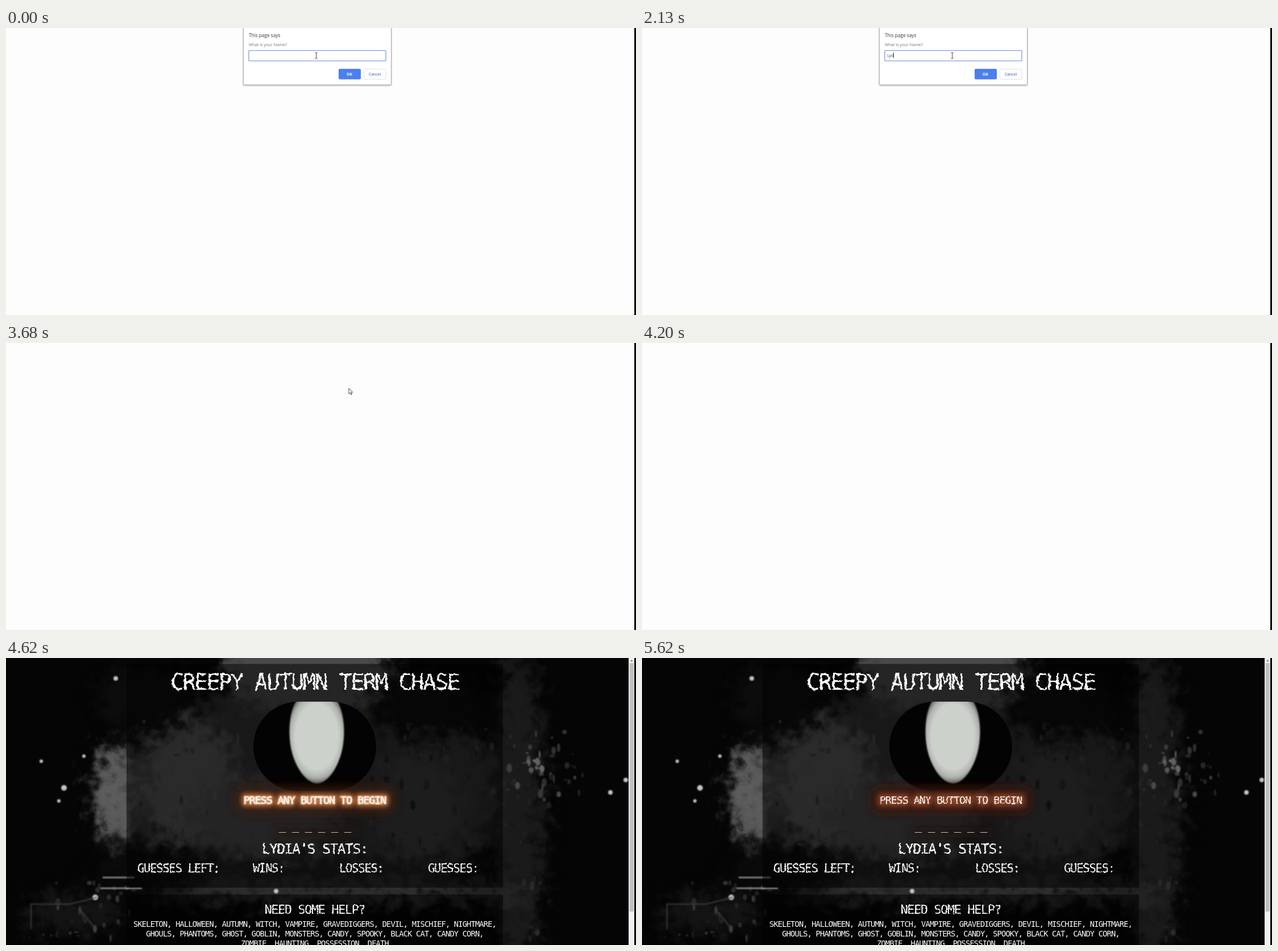
Recreate the animation shown at these times as an HTML page. Size 1108 by 506 pixels, loop 5.72 s.

```html
<!DOCTYPE html>
<html lang="en">
<head>
<meta charset="utf-8">
<title>Word game</title>
<style>
  html, body { margin: 0; width: 100%; height: 100%; overflow: hidden; background: #fdfdfd; }
  svg { display: block; width: 1108px; height: 506px; }
  .ui { font-family: "Open Sans", "Noto Sans", sans-serif; }
  .bone text { font-family: "DejaVu Sans Mono", monospace; letter-spacing: -.06em; white-space: pre; }
  .mid { text-anchor: middle; }
</style>
</head>
<body>
<svg viewBox="0 0 1108 506" xmlns="http://www.w3.org/2000/svg">
  <defs>
    <filter id="haze" x="-10%" y="-10%" width="120%" height="120%" color-interpolation-filters="sRGB">
      <feGaussianBlur stdDeviation="14" result="soft"/>
      <feTurbulence type="fractalNoise" baseFrequency=".045" numOctaves="4" seed="8"/>
      <feDisplacementMap in="soft" scale="75" xChannelSelector="R" yChannelSelector="G"/>
    </filter>
    <filter id="rough" x="-5%" y="-20%" width="110%" height="140%" color-interpolation-filters="sRGB">
      <feTurbulence type="fractalNoise" baseFrequency=".16" numOctaves="2" seed="3"/>
      <feDisplacementMap in="SourceGraphic" scale="6" xChannelSelector="R" yChannelSelector="G"/>
    </filter>
    <filter id="rough2" x="-5%" y="-20%" width="110%" height="140%" color-interpolation-filters="sRGB">
      <feTurbulence type="fractalNoise" baseFrequency=".25" numOctaves="2" seed="5"/>
      <feDisplacementMap in="SourceGraphic" scale="3" xChannelSelector="R" yChannelSelector="G"/>
    </filter>
    <filter id="blur1" x="-10%" y="-50%" width="120%" height="200%"><feGaussianBlur stdDeviation="1.1"/></filter>
    <filter id="blur4" x="-20%" y="-200%" width="140%" height="500%"><feGaussianBlur stdDeviation="4"/></filter>
    <filter id="blur9" x="-20%" y="-400%" width="140%" height="900%"><feGaussianBlur stdDeviation="8"/></filter>
    <filter id="shade" x="-5%" y="-5%" width="110%" height="115%">
      <feDropShadow dx="0" dy="1" stdDeviation="1" flood-opacity=".4"/>
    </filter>
    <radialGradient id="skin" cx=".5" cy=".44" r=".56">
      <stop offset=".7" stop-color="#cdd1cc"/>
      <stop offset=".88" stop-color="#aeb2ad"/>
      <stop offset="1" stop-color="#6d706c"/>
    </radialGradient>
    <clipPath id="pill"><rect x="435" y="77" width="216" height="158" rx="79"/></clipPath>
    <clipPath id="view"><rect width="1095" height="506"/></clipPath>
  </defs>

  <rect width="1108" height="506" fill="#fdfdfd"/>

  <g id="dialog" class="ui">
    <rect x="417.5" y="-6" width="260" height="106" rx="1" fill="#fff" stroke="#b4b4b4" filter="url(#shade)"/>
    <text x="427" y="16" font-size="8.25" fill="#3a3433">This page says</text>
    <text x="427" y="32" font-size="7.2" fill="#7d7370">What is your Name?</text>
    <rect x="427" y="39.7" width="241" height="18.3" rx="1" fill="#fff" stroke="#6488d8" stroke-width="1.1"/>
    <text id="entry" x="431.5" y="51" font-size="6.5" fill="#4a4646"></text>
    <rect id="caret" y="43" width="1" height="10" fill="#444"/>
    <rect x="585" y="72" width="39" height="18.5" rx="2" fill="#4b7ff0"/>
    <text x="604" y="83.7" class="mid" font-size="6.8" font-weight="700" fill="#fff">OK</text>
    <rect x="629.5" y="72.5" width="38.5" height="18" rx="2" fill="#fff" stroke="#dfe2ea"/>
    <text x="648.7" y="83.7" class="mid" font-size="6.7" font-weight="600" fill="#5c78cc">Cancel</text>
    <path id="beam" d="M543.5 43.5h1.5l.7.6.7-.6h1.5M545.7 44v9M543.5 53.5h1.5l.7-.6.7.6h1.5" fill="none" stroke="#333" stroke-width=".9"/>
  </g>
  <path id="arrow" d="M0 0V9.6L2.3 7.6 3.9 11.2 5.4 10.5 3.9 7H6.8Z" fill="#fff" stroke="#222" stroke-width=".8"/>

  <g id="game" clip-path="url(#view)">
    <rect width="1095" height="506" fill="#050505"/>
    <g id="scene" filter="url(#haze)"></g>
    <g id="sparks" filter="url(#blur1)"></g>
    <path d="M166 406H239M170 387H226" stroke="#bbb" stroke-width="2.4" filter="url(#blur1)" opacity=".8"/>
    <path d="M44 478V434H112L160 422M128 442L158 478" fill="none" stroke="#444" stroke-width="3" filter="url(#blur1)" opacity=".6"/>
    <path d="M212 10.500H874V405H212ZM212 417H874V506H212Z" fill="#000" opacity=".5"/>
    <g clip-path="url(#pill)">
      <rect x="435" y="77" width="216" height="158" fill="#030303"/>
      <path d="M512 74C498 92 496 130 501 158C507 190 527 221 547 221C567 221 586 190 592 158C597 130 595 94 581 74Z" fill="url(#skin)" filter="url(#blur1)"/>
    </g>
    <g class="bone" fill="#fff">
      <g id="glow">
        <use href="#press" id="outer" filter="url(#blur9)" stroke-width="34" stroke-linejoin="round"/>
        <use href="#press" id="inner" filter="url(#blur4)" stroke-width="9" stroke-linejoin="round"/>
        <use href="#press" id="core" filter="url(#blur1)" stroke="#ffe2c4" stroke-width="2"/>
        <use href="#blanks" id="faint" filter="url(#blur9)" stroke-width="16"/>
      </g>
      <text x="543" y="55.500" class="mid" font-size="39" filter="url(#rough)">CREEPY AUTUMN TERM CHASE</text>
      <g filter="url(#rough2)">
        <text id="press" x="543" y="256.500" class="mid" font-size="18.500">PRESS ANY BUTTON TO BEGIN</text>
        <text x="543" y="344.500" class="mid" font-size="24.500">LYDIA'S STATS:</text>
        <g id="stats" font-size="20.500"></g>
        <text x="543" y="450.500" class="mid" font-size="21.700">NEED SOME HELP?</text>
      </g>
      <text id="blanks" x="543" y="302.500" class="mid" font-size="21.200" fill="#e8d9cc">_ _ _ _ _ _</text>
      <g id="words" class="mid" font-size="13.700"></g>
    </g>
  </g>

  <g id="scroll">
    <rect x="1095" width="10" height="506" fill="#f1f1f1"/>
    <rect x="1096.5" y="9" width="7.500" height="438" fill="#c1c1c1"/>
    <path d="M1098 6L1100.300 3L1102.600 6Z" fill="#777"/>
  </g>
  <rect x="1105" width="3" height="506" fill="#000"/>
</svg>
<script>
const LOOP = 5720, GAME_START = 4350;
const $ = id => document.getElementById(id);

function add(parent, tag, attrs, text = '') {
  const el = document.createElementNS('http://www.w3.org/2000/svg', tag);
  for (const key in attrs) el.setAttribute(key, attrs[key]);
  el.textContent = text;
  return parent.appendChild(el);
}

function randomizer(seed) {
  return () => (seed = (seed * 16807) % 2147483647) / 2147483647;
}

const grey = v => `rgb(${v},${v},${v})`;

function buildScene() {
  // centre, radii, brightness
  const blobs = [
    [530, 240, 350, 190, 48], [900, 270, 45, 290, 26], [530, 20, 150, 90, 74],
    [190, 240, 34, 85, 92], [320, 220, 80, 115, 84], [450, 280, 130, 70, 72],
    [720, 260, 80, 90, 58], [580, 412, 330, 18, 52], [740, 90, 110, 55, 12],
    [245, 70, 80, 65, 12], [270, 370, 110, 42, 10], [560, 375, 250, 22, 26],
    [120, 450, 90, 35, 20]
  ];
  for (const [cx, cy, rx, ry, v] of blobs)
    add($('scene'), 'ellipse', { cx, cy, rx, ry, fill: grey(v) });

  const lights = [[193, 36, 4], [102, 229, 5], [93, 252, 3], [62, 182, 3],
    [157, 422, 5], [475, 411, 4], [1063, 237, 4], [1090, 215, 4], [137, 173, 3]];
  for (const [cx, cy, r] of lights)
    add($('sparks'), 'circle', { cx, cy, r, fill: '#c4c4c4' });

  const rnd = randomizer(77);
  const scatter = (count, x, y, w, h, size, dark, bright) => {
    for (let i = 0; i < count; i++)
      add($('sparks'), 'ellipse', {
        cx: x + rnd() * w, cy: y + rnd() * h,
        rx: 1 + rnd() * size, ry: 1 + rnd() * size * 1.8,
        fill: grey(dark + rnd() * (bright - dark))
      });
  };
  scatter(45, 880, 130, 140, 130, 4, 25, 75);
  scatter(14, 915, 165, 30, 35, 4, 70, 110);
  scatter(20, 885, 290, 60, 210, 4, 20, 42);
  scatter(35, 40, 395, 200, 100, 4, 20, 65);
  scatter(60, 640, 110, 220, 230, 5, 30, 60);
  scatter(45, 225, 100, 200, 230, 6, 45, 85);
}

function buildText() {
  const stats = { 'GUESSES LEFT:': 231, 'WINS:': 434, 'LOSSES:': 586, 'GUESSES:': 742 };
  for (const label in stats)
    add($('stats'), 'text', { x: stats[label], y: 378 }, label);
  [
    'SKELETON, HALLOWEEN, AUTUMN, WITCH, VAMPIRE, GRAVEDIGGERS, DEVIL, MISCHIEF, NIGHTMARE,',
    'GHOULS, PHANTOMS, GHOST, GOBLIN, MONSTERS, CANDY, SPOOKY, BLACK CAT, CANDY CORN,',
    'ZOMBIE, HAUNTING, POSSESSION, DEATH'
  ].forEach((line, i) => add($('words'), 'text', { x: 543, y: 473.5 + i * 17.3 }, line));
}

// time, typed text, caret visible
const typing = [
  [0, '', 0], [440, '', 1], [720, 'l', 1], [1280, 'l', 0], [1710, '', 1],
  [1860, 'L', 1], [2010, 'Ly', 1], [2130, 'Lyd', 1], [2280, 'Lydi', 1],
  [2430, 'Lydia', 1], [3010, 'Lydia', 0], [3530, 'Lydia', 1]
];
// time, pointer tip
const pointer = [
  [3010, 593, 90], [3130, 602, 89], [3260, 603, 83], [3380, 601, 79],
  [3530, 600, 78], [3680, 603, 80], [3810, 899, 258], [3960, 1018, 422]
];
const latest = (steps, t) => steps.filter(step => step[0] <= t).pop();
const show = (id, on) => $(id).setAttribute('display', on ? 'inline' : 'none');
const mix = (a, b, p) => `rgb(${a.map((v, i) => Math.round(v + (b[i] - v) * p))})`;

function draw(t) {
  const playing = t >= GAME_START;
  show('dialog', t < 3680);
  show('beam', t < 3010);
  show('arrow', t >= 3010 && t < 4200);
  show('game', playing);
  show('scroll', playing);

  const [, typed, caretOn] = latest(typing, t);
  $('entry').textContent = typed;
  show('caret', caretOn);
  if (t < 3680)
    $('caret').setAttribute('x', Math.round(431.2 + (typed ? $('entry').getComputedTextLength() : 0)));

  const tip = latest(pointer, t);
  if (tip) $('arrow').setAttribute('transform', `translate(${tip[1]} ${tip[2]})`);

  if (playing) {
    const linear = (t - GAME_START) / (LOOP - GAME_START);
    const p = (1 - Math.cos(Math.PI * linear)) / 2;
    const paint = (id, from, to) => {
      const color = mix(from, to, p);
      $(id).setAttribute('stroke', color);
    };
    paint('outer', [60, 32, 16], [58, 24, 15]);
    paint('inner', [196, 118, 66], [134, 66, 38]);
    paint('faint', [34, 20, 12], [30, 14, 10]);
    $('outer').setAttribute('opacity', .8 + .15 * p);
    $('faint').setAttribute('opacity', .7);
    $('core').setAttribute('opacity', .85 * (1 - p));
  }
}

buildScene();
buildText();
const start = performance.now();
(function tick() {
  draw((performance.now() - start) % LOOP);
  requestAnimationFrame(tick);
})();
</script>
</body>
</html>
```
